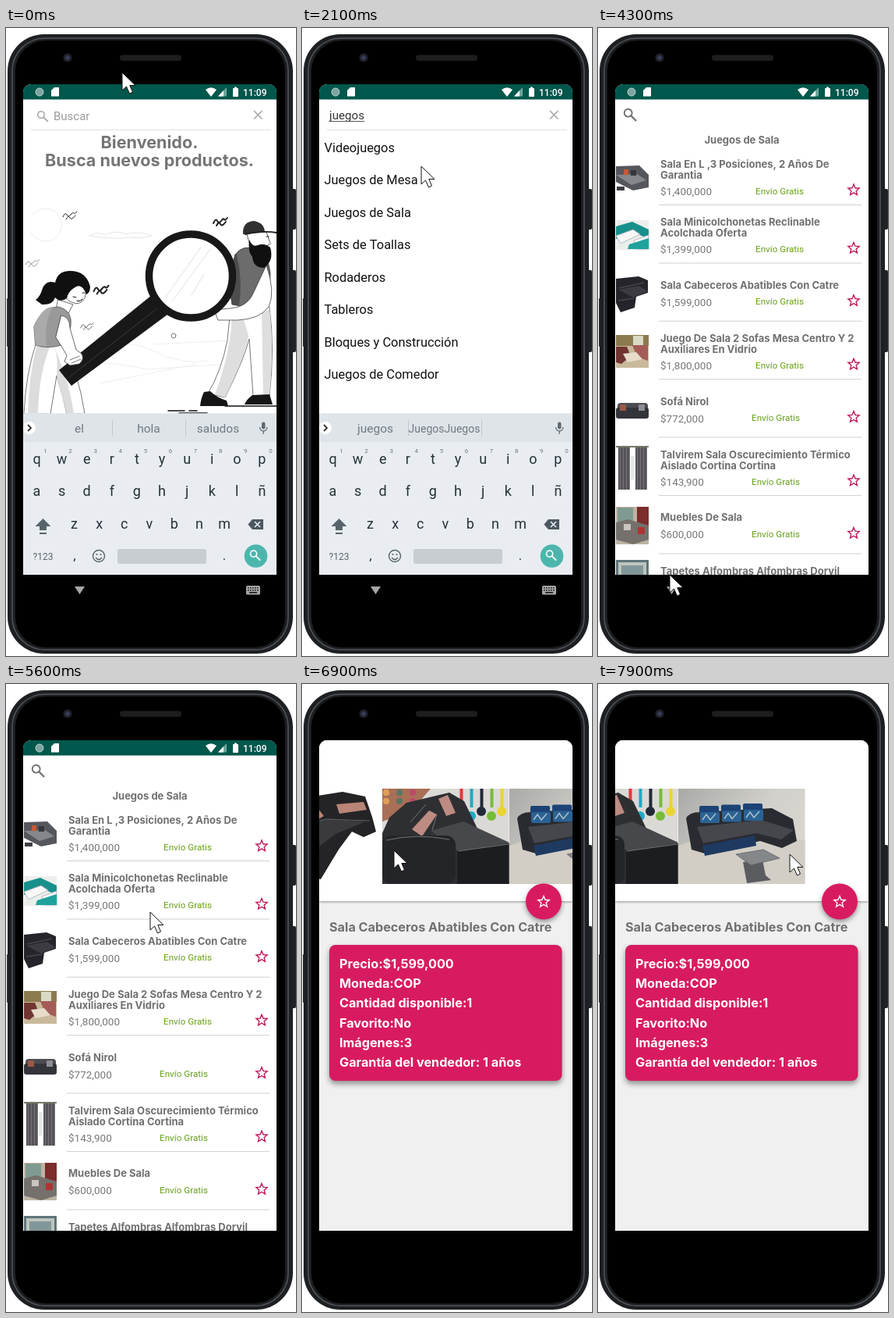
Animation, 372 px wide and 804 px high, one loop 8000 ms. Source, as an HTML page with a canvas:

```html
<!DOCTYPE html>
<html lang="es">
<head>
<meta charset="utf-8">
<style>
html, body { margin: 0; width: 100%; height: 100%; overflow: hidden; background: #fff; }
canvas { display: block; width: 372px; height: 804px; }
</style>
</head>
<body>
<canvas id="stage"></canvas>
<script>
const W = 372, H = 804, LOOP = 8000;
const canvas = document.getElementById('stage');
const c = canvas.getContext('2d');
const dpr = window.devicePixelRatio || 1;
canvas.width = W * dpr;
canvas.height = H * dpr;

const BODY = 'Roboto, sans-serif', HEAD = 'Inter, sans-serif';
const PINK = '#d81b60', GREY = '#707070';
const SCREEN = { x: 22, y: 72, w: 325, h: 628 };

// ---- helpers ----
function text(s, x, y, size, color, { align = 'left', weight = 400, family = BODY } = {}) {
  c.font = `${weight} ${size}px ${family}`;
  c.textAlign = align;
  c.fillStyle = color;
  c.fillText(s, x, y);
}
const head = (s, x, y, size, color = GREY, align = 'left') =>
  text(s, x, y, size, color, { align, weight: 700, family: HEAD });

function box(x, y, w, h, color, r = 0) {
  c.fillStyle = color;
  c.beginPath();
  c.roundRect(x, y, w, h, r);
  c.fill();
}
function line(d, color, width = 1) {
  c.strokeStyle = color;
  c.lineWidth = width;
  c.stroke(new Path2D(d));
}
function shape(d, fill, stroke, width = 0.8) {
  const p = new Path2D(d);
  if (fill) { c.fillStyle = fill; c.fill(p); }
  if (stroke) { c.strokeStyle = stroke; c.lineWidth = width; c.stroke(p); }
}
function disc(x, y, r, fill, stroke, width = 1) {
  c.beginPath();
  c.arc(x, y, r, 0, 7);
  if (fill) { c.fillStyle = fill; c.fill(); }
  if (stroke) { c.strokeStyle = stroke; c.lineWidth = width; c.stroke(); }
}
function at(x, y, draw, scale = 1) {
  c.save();
  c.translate(x, y);
  c.scale(scale, scale);
  draw();
  c.restore();
}
function star(x, y, r, color) {
  c.beginPath();
  for (let i = 0; i < 10; i++) {
    const a = i * Math.PI / 5 - Math.PI / 2, q = i % 2 ? r * 0.45 : r;
    c.lineTo(x + q * Math.cos(a), y + q * Math.sin(a));
  }
  c.closePath();
  c.strokeStyle = color;
  c.lineWidth = 1.4;
  c.stroke();
}
function lens(x, y, color, s = 1) {
  at(x, y, () => {
    disc(-2, -2, 4.3, null, color, 1.7);
    line('M1 1L7 7', color, 2);
  }, s);
}
const ease = k => k * k * (3 - 2 * k);
const ramp = (t, a, b) => ease(Math.min(1, Math.max(0, (t - a) / (b - a))));

// ---- phone ----
function phone() {
  box(366, 206, 6, 52, '#202226', 2);
  box(366, 310, 6, 105, '#202226', 2);
  box(1, 346, 3, 62, '#3a3c40', 1);
  box(2, 8, 366, 793, '#1d1f22', 47);
  c.lineWidth = 1.6;
  c.strokeStyle = '#505359';
  c.beginPath();
  c.roundRect(8, 13, 354, 783, 42);
  c.stroke();
  box(12, 16, 346, 777, '#000', 39);
  disc(79, 38, 5.5, '#20222a');
  disc(79, 38, 2.5, '#3b4060');
  box(146, 34.5, 79, 7.5, '#1d1d1f', 3.5);
}
function navIcons(keys) {
  shape('M88 715H101L94.500 725Z', '#a6a6a6');
  if (!keys) return;
  box(308, 714, 18, 11.500, '#a6a6a6', 1.5);
  for (let i = 0; i < 5; i++)
    for (let j = 0; j < 2; j++) box(310 + i * 3, 716 + j * 3, 1.6, 1.6, '#111');
  box(312, 722, 10, 1.500, '#111');
}
function statusBar() {
  box(22, 72, 325, 19.5, '#00574b');
  disc(43, 82, 5, '#7ba69f', '#b9d0cc', 1);
  shape('M62 76H68V87.500H58V80Z', '#fff');
  shape('M256 79Q263 73.500 270 79L263 88Z', '#fff');
  shape('M283 76V87.500H272Z', '#6fa59d');
  shape('M279 80V87.500H272Z', '#fff');
  box(291, 77, 7, 11, '#fff', 1);
  box(293, 75.500, 3, 2, '#fff');
  text('11:09', 304, 86.500, 12, '#fff', { weight: 500 });
}

// ---- keyboard ----
function keyboard(typed) {
  const ink = '#263238', dim = '#707a80', step = 32.1;
  box(22, 493.5, 325, 206.5, '#e9edf1');
  box(22, 493.5, 325, 36.5, '#dfe4e8');
  disc(30, 512, 8, '#fff');
  line('M28 508L32 512L28 516', '#333', 1.8);
  box(136, 502, 1, 20, '#c1c8cc');
  box(230, 502, 1, 20, '#c1c8cc');
  const mid = { align: 'center' };
  text(typed || 'el', 94, 518, 15.5, dim, mid);
  if (!typed) {
    text('hola', 183, 518, 15.500, dim, mid);
    text('saludos', 272, 518, 15.500, dim, mid);
  } else if (typed === 'juegos') {
    text('JuegosJuegos', 182.5, 518, 14, dim, { align: 'center', weight: 'condensed' });
  }
  box(328, 504.500, 4.500, 9, '#606a70', 2.2);
  line('M325.500 511Q326 516 330.200 516Q334.500 516 335 511M330.200 516V520', '#606a70', 1.3);

  const row = (keys, x, y) => [...keys].forEach((k, i) =>
    text(k, x + i * step, y, 18, ink, mid));
  row('qwertyuiop', 39.5, 558);
  row('asdfghjklñ', 39.5, 599);
  row('zxcvbnm', 87.5, 641);
  for (let i = 0; i < 10; i++) text((i + 1) % 10, 50.500 + i * step, 544, 8, dim, mid);

  shape('M47.500 628L57.500 638H52V643H43V638H37.500Z', '#57646b');
  box(43, 646, 9, 2, '#57646b');
  shape('M310.500 635.500L316 629H330V642H316Z', '#4b585f');
  line('M319 632L326 639M326 632L319 639', '#e9edf1', 1.600);
  text('?123', 47.5, 680.5, 12, '#59656b', mid);
  text(',', 88, 681, 17, ink, mid);
  disc(119, 676, 7.5, null, '#59656b', 1.4);
  disc(116.5, 674, 1.1, '#59656b');
  disc(121.5, 674, 1.1, '#59656b');
  line('M115 678Q119 683 123 678', '#59656b', 1.400);
  box(143, 667, 114, 19, '#c8cdd1', 2.500);
  text('.', 280, 681, 17, ink, mid);
  disc(320.500, 676, 14.800, '#4db6ac');
  lens(319.500, 675, '#fff', 0.95);
}

// ---- welcome ----
function squiggle(x, y, s, width, color = '#222') {
  at(x, y, () => line('M-9 3Q-6 -4 -4 0T1 0T5 -2T9 -4M-5 6Q-2 0 0 4T7 1', color, width), s);
}
function man() {
  shape('M288 360L284 400Q276 440 259 468L281 473Q305 425 312 398L317 471H338Q345 410 338 358Z', '#fff', '#555');
  shape('M290 362Q290 410 268 469L281 473Q307 420 311 394L303 366ZM328 365L330 471H338Q344 410 338 360Z', '#dedede');
  shape('M254 466L262 465Q270 473 283 477L285 484H249Q250 474 254 466ZM316 470L338 469L342 482H306Q308 476 316 470Z', '#151515');
  shape('M294 290Q304 276 322 284Q337 292 339 314L338 350Q315 361 290 354Q283 320 294 290Z', '#6c6c6c', '#333');
  shape('M296 290Q304 325 299 355L290 354Q283 320 294 290Z', '#4d4d4d');
  shape('M334 304Q346 338 337 357Q325 373 297 374L272 374L267 361L287 359Q310 358 318 338Z', '#fff', '#444');
  shape('M309 263L334 261L338 273Q341 277 336 278L316 287Z', '#fff', '#333');
  shape('M312 271Q316 281 323 278Q332 275 339 281Q344 298 331 307Q317 307 316 293Q310 287 312 271Z', '#101010');
  shape('M304 264Q303 248 318 247Q331 249 332 261Z', '#303030');
  line('M307 264Q330 259 347 262', '#202020', 2);
  line('M334 267L337 267', '#222', 1.200);
}
function woman() {
  shape('M39 402Q25 444 23 494H57L65 445Q73 470 78 494H101Q93 440 72 402Z', '#fff', '#555');
  shape('M40 404Q29 445 28 494H41Q42 440 58 404ZM65 445Q67 425 63 410L74 440Q83 465 87 494H78Z', '#dcdcdc');
  shape('M67 348L86 354L79 367L64 362Z', '#fff', '#444');
  shape('M36 382Q46 357 68 357Q86 362 83 382Q76 398 74 405Q55 412 38 406Z', '#999', '#555');
  shape('M36 382Q46 357 60 357Q48 378 52 408L38 406Z', '#aaa');
  shape('M75 337Q78 323 95 323Q106 331 101 346Q95 356 84 351Q75 348 75 337Z', '#fff', '#444');
  shape('M78 346Q70 352 63 345Q60 355 46 354L38 348Q44 344 47 333Q52 322 63 326Q66 311 82 311Q103 311 108 331Q108 339 103 341Q97 325 87 333Q80 337 78 346Z', '#101010');
  line('M86 344L90 345M98 339L101 339M91 349Q95 351 98 347', '#222', 1.200);
}
function welcome() {
  head('Bienvenido.', 184, 154, 21.6, '#757575', 'center');
  head('Busca nuevos productos.', 184, 177, 21.6, '#757575', 'center');
  const faint = '#e6e6e6';
  c.lineCap = 'round';
  line('M34 239A21 21 0 1 1 32 262', '#f2ebe4');
  line('M107 266Q115 260 127 265Q140 258 154 264Q170 259 187 266Q178 270 160 268Q138 271 107 266', faint);
  line('M112 412Q155 396 190 414T260 426M190 405L288 400M22 436Q110 420 180 437L290 430M120 455L245 430', '#eeeeee');
  squiggle(82, 239, 1, 1);
  squiggle(275, 247, 1, 2);
  squiggle(34, 300, 0.95, 0.8, '#777');
  squiggle(122, 334, 1.05, 2);
  squiggle(104, 381, 0.9, 1, '#555');
  disc(215, 394, 3, null, '#777');
  line('M281 484H347', '#111', 1.5);
  line('M208 490H229M235 490H245M222 493H258', '#111', 1.6);
  man();
  woman();
  shape('M187 342L211 364L84 458L68 438Z', '#181818');
  line('M194 359L81 447', '#3b3b3b', 1);
  disc(237, 317.500, 53.500, 'rgba(255,255,255,.94)', '#181818', 9.500);
  line('M205 344L250 281M214 349L262 283M238 342L254 315', faint, 1.2);
  shape('M71 368Q82 370 82 384L90 412L97 417Q101 424 94 430L82 432L75 427L78 419L64 396Z', '#fff', '#444');
  line('M82 425L94 420M84 429L96 424', '#555', 0.8);
  c.lineCap = 'butt';
}

// ---- search and categories ----
const CATEGORIES = ['Videojuegos', 'Juegos de Mesa', 'Juegos de Sala', 'Sets de Toallas',
  'Rodaderos', 'Tableros', 'Bloques y Construcción', 'Juegos de Comedor'];

function searchField(typed) {
  if (typed) {
    text(typed, 35, 117, 15.2, '#333');
    box(35, 119, c.measureText(typed).width, 1, '#555');
  } else {
    lens(47, 113, '#b0b0b0');
    text('Buscar', 61, 118, 15, '#9b9b9b');
  }
  line('M318 106L328.500 116.500M328.500 106L318 116.500', '#a5a5a5', 1.500);
  box(32, 130, 308, 1, '#e0e0e0');
}

// ---- results ----
const ITEMS = [
  ['1,400,000', 'Sala En L ,3 Posiciones, 2 Años De', 'Garantia'],
  ['1,399,000', 'Sala Minicolchonetas Reclinable', 'Acolchada Oferta'],
  ['1,599,000', 'Sala Cabeceros Abatibles Con Catre'],
  ['1,800,000', 'Juego De Sala 2 Sofas Mesa Centro Y 2', 'Auxiliares En Vidrio'],
  ['772,000', 'Sofá Nirol'],
  ['143,900', 'Talvirem Sala Oscurecimiento Térmico', 'Aislado Cortina Cortina'],
  ['600,000', 'Muebles De Sala'],
  ['90,000', 'Tapetes Alfombras Alfombras Dorvil', 'Decorativos'],
];
const THUMBS = [
  () => {
    shape('M23 177L53 176L65 188V204L45 208L23 197Z', '#55575c');
    shape('M23 188L50 187L62 195L43 201Z', '#85878b');
    box(33, 181, 6, 7, '#c65a36'); box(42, 182, 7, 7, '#35363a');
    box(24, 203, 10, 5, '#3d3e42');
  },
  () => {
    box(23, 246, 42, 38, '#eceeec');
    shape('M23 254L44 248L65 258V270L47 262L23 270Z', '#188f8b');
    shape('M23 266L45 258L54 264L29 276ZM46 272L65 265V283H48Z', '#f8f8f8', '#aab');
    shape('M40 277L65 269V283H38Z', '#20a29c');
  },
  () => {
    shape('M23 321L52 318L64 323V339L49 344L47 358L29 364L23 352Z', '#25242a');
    shape('M26 335L52 330L64 337L45 345Z', '#3d3b42');
    line('M27 333L59 326M26 349L46 346', '#59535b');
  },
  () => {
    box(23, 393, 42, 42, '#c9b99b');
    box(23, 393, 42, 14, '#8d7a4f'); box(45, 394, 13, 13, '#d9d9c6');
    shape('M23 408H37L42 420L30 430L23 428Z', '#70352f');
    shape('M44 406H64V426L50 421Z', '#a45c56');
    shape('M32 417L49 415L57 424L38 428Z', '#e6dcc9');
  },
  () => {
    box(25, 480, 39, 17, '#4b4d52', 4);
    box(23, 486, 42, 14, '#33353a', 3);
    box(28, 482, 8, 8, '#9b5746'); box(52, 482, 8, 8, '#8b8d90');
  },
  () => {
    box(23, 535, 42, 2, '#776');
    box(26, 537, 15, 54, '#56545a'); box(48, 537, 15, 54, '#56545a');
    for (let i = 0; i < 8; i++) box(28 + i % 4 * 4 + (i > 3) * 22, 537, 1, 54, '#77757a');
    box(42, 548, 5, 30, '#e5e8e4');
  },
  () => {
    box(23, 613, 42, 48, '#bdb3a2');
    box(25, 614, 20, 18, '#7f9a91'); box(50, 613, 15, 25, '#7b2e2c');
    shape('M23 633L39 629L65 637V655L45 661L23 655Z', '#74706c');
    box(33, 635, 9, 8, '#c9c5bc'); box(51, 639, 9, 9, '#ad3531');
  },
  () => {
    box(23, 681, 42, 25, '#5f7479');
    box(26, 684, 36, 22, '#bcc5bd'); box(30, 688, 28, 20, '#82979a');
  },
];
function results(pictures) {
  lens(41, 111, '#757575', 1.15);
  head('Juegos de Sala', 184.5, 147.5, 13, GREY, 'center');
  ITEMS.forEach(([price, title, more], i) => {
    const end = 226 + i * 74.4, base = end - (more ? 12.5 : 19.5);
    const titleY = end - (more ? 47 : 41);
    head(title, 80, titleY, 13);
    if (more) head(more, 80, titleY + 13.5, 13);
    text('$' + price, 80, base + 0.500, 13.5, '#777');
    text('Envío Gratis', price.length > 7 ? 202 : 197, base - 1, 11.7, '#689f18');
    star(328, base - 6, 7.500, '#c2185b');
    box(78, end, 260, 1, '#d0d0d0');
    if (pictures) THUMBS[i]();
  });
}

// ---- detail ----
const SLIDES = [
  () => {
    shape('M10 30L62 12L112 4L141 10L150 36L155 55L139 62L124 55L107 78L84 116L17 96Z', '#242426');
    shape('M34 56L92 38L142 42L103 58L82 74L28 84Z', '#3a3a3d');
    shape('M64 24L75 18L88 35L76 42ZM104 20L139 17L143 27L108 32Z', '#b98577');
    line('M16 58L91 39L147 41M31 85L83 76', '#5b5b5d');
  },
  () => {
    box(0, 0, 163, 122, '#dbd9d6');
    shape('M0 0H62L36 30L0 42Z', '#a96f57');
    for (let i = 0; i < 12; i++)
      disc(5 + i * 17 % 51, 5 + i * 11 % 22, 4, ['#df9e58', '#5c7562', '#bc4b66'][i % 3]);
    ['#e33838', '#20a9c4', '#202a36', '#78bb38', '#e9d432'].forEach((col, i) => {
      const x = 101 + i * 13;
      box(x - 1.5, 0, 4, 24, col);
      disc(x, 29 + i % 2 * 6, 6, col);
    });
    shape('M9 37L31 18L86 5L105 16L122 51L163 70V122H0V57Z', '#2e2f32');
    shape('M62 54L104 42L163 69L144 79L96 79Z', '#47484b');
    shape('M38 52L60 28L70 33L51 61ZM72 13L84 8L94 31L82 35Z', '#bd8b82');
    box(0, 60, 94, 62, '#242528', 12);
    shape('M96 80L163 70V122H96Z', '#1c1d20');
    line('M5 66Q43 57 86 65M97 80L162 71M36 43L56 20M70 33L64 53', '#737477', 1);
  },
  () => {
    const wall = c.createLinearGradient(0, 0, 163, 122);
    wall.addColorStop(0, '#a9a9a6');
    wall.addColorStop(0.5, '#d1d0cb');
    wall.addColorStop(1, '#dedad1');
    c.fillStyle = wall;
    c.fillRect(0, 0, 163, 122);
    shape('M0 73L80 45L163 67V122H0Z', '#d2cec6');
    shape('M10 38Q14 30 28 30L120 25L147 39L152 67L133 76L105 67L34 83L17 78Z', '#292b30');
    shape('M24 49L106 40L148 53L132 65L100 57L32 70Z', '#45474c');
    for (let i = 0; i < 3; i++) {
      const x = 27 + i * 28, y = 22 - i * 1.5;
      box(x, y, 25, 10, '#1c4376', 2);
      box(x + 1, y + 8, 25, 14, '#2b6294', 2);
      line(`M${x + 4} ${y + 18}l5 -7l5 7l7 -8`, '#a9c1cc', 1.5);
    }
    shape('M31 73L98 60L100 73L34 86Z', '#1f3a61');
    shape('M83 94L108 91L112 111L119 117L88 121Z', '#5a5c60');
    shape('M74 84L109 78L130 89L93 98Z', '#85888b', '#5d6064');
  },
];
const FACTS = ['Precio:$1,599,000', 'Moneda:COP', 'Cantidad disponible:1', 'Favorito:No',
  'Imágenes:3', 'Garantía del vendedor: 1 años'];

function shadow(blur, y, draw) {
  c.save();
  c.shadowColor = 'rgba(0,0,0,.4)';
  c.shadowBlur = blur * dpr;
  c.shadowOffsetY = y * dpr;
  draw();
  c.restore();
}
function detail(t) {
  box(22, 72, 325, 628, '#f0f0f0');
  shadow(3, 1, () => box(22, 72, 325, 206, '#fff'));
  if (t >= 6200) {
    const pos = ramp(t, 6450, 6800) + ramp(t, 7300, 7700);
    SLIDES.forEach((draw, i) => at(103 + (i - pos) * 163, 134, () => {
      c.beginPath();
      c.rect(0, 0, 162.5, 122);
      c.clip();
      draw();
    }));
  }
  shadow(6, 3, () => disc(310, 278.500, 23, PINK));
  star(310, 279, 7.500, '#fff');
  head('Sala Cabeceros Abatibles Con Catre', 35, 317, 16.2);
  shadow(7, 4, () => box(35, 334, 298.5, 174, PINK, 8));
  FACTS.forEach((s, i) => head(s, 48, 364 + i * 25.2, 16.2, '#fff'));
}

// ---- pointer: time, x, y ----
const PATH = [
  [0, 149, 57], [1900, 149, 57], [2100, 153, 177], [2500, 148, 229], [3000, 148, 229],
  [3700, 213, 297], [4200, 92, 700], [4300, 92, 700], [4400, 76, 556], [4500, 159, 326],
  [5100, 159, 326], [5600, 185, 292], [5800, 190, 328], [6100, 239, 252], [6400, 245, 212],
  [6750, 118, 213], [6950, 118, 213], [7250, 262, 216], [7600, 130, 218], [7700, 130, 218],
  [7900, 246, 218], [8000, 246, 218],
];
function pointer(t) {
  const i = PATH.findIndex(p => p[0] > t);
  const [t0, x0, y0] = PATH[i - 1], [t1, x1, y1] = PATH[i];
  const k = ease((t - t0) / (t1 - t0));
  at(x0 + (x1 - x0) * k, y0 + (y1 - y0) * k, () =>
    shape('M0 0V23L5.500 18L9.500 27L13.500 25L9.800 16.500H17Z', '#fff', '#111', 1));
}

function screen(t) {
  box(22, 72, 325, 628, '#fff');
  if (t >= 5900) return detail(t);
  const word = 'juegos';
  const typed = word.slice(0, Math.max(0, Math.floor((t - 500) / 170)));
  if (t >= 3600) results(t >= 4300);
  else if (t >= 2800) lens(41, 111, '#757575', 1.15);
  else {
    searchField(typed);
    if (t < 1700) welcome();
    else if (t >= 1900) CATEGORIES.forEach((s, i) => text(s, 28.500, 158.500 + i * 41.5, 16.4, '#111'));
  }
  statusBar();
  if (t < 4300) keyboard(typed);
}

function render(t) {
  c.setTransform(dpr, 0, 0, dpr, 0, 0);
  c.fillStyle = '#fff';
  c.fillRect(0, 0, W, H);
  phone();
  c.save();
  c.beginPath();
  c.roundRect(SCREEN.x, SCREEN.y, SCREEN.w, SCREEN.h, [10, 10, 0, 0]);
  c.clip();
  screen(t);
  c.restore();
  if (t < 5100) navIcons(t < 4300);
  pointer(t);
}

const start = performance.now();
function tick() {
  const t = (performance.now() - start) % LOOP;
  render(Math.floor(t / 100) * 100);
  requestAnimationFrame(tick);
}
tick();
</script>
</body>
</html>
```
